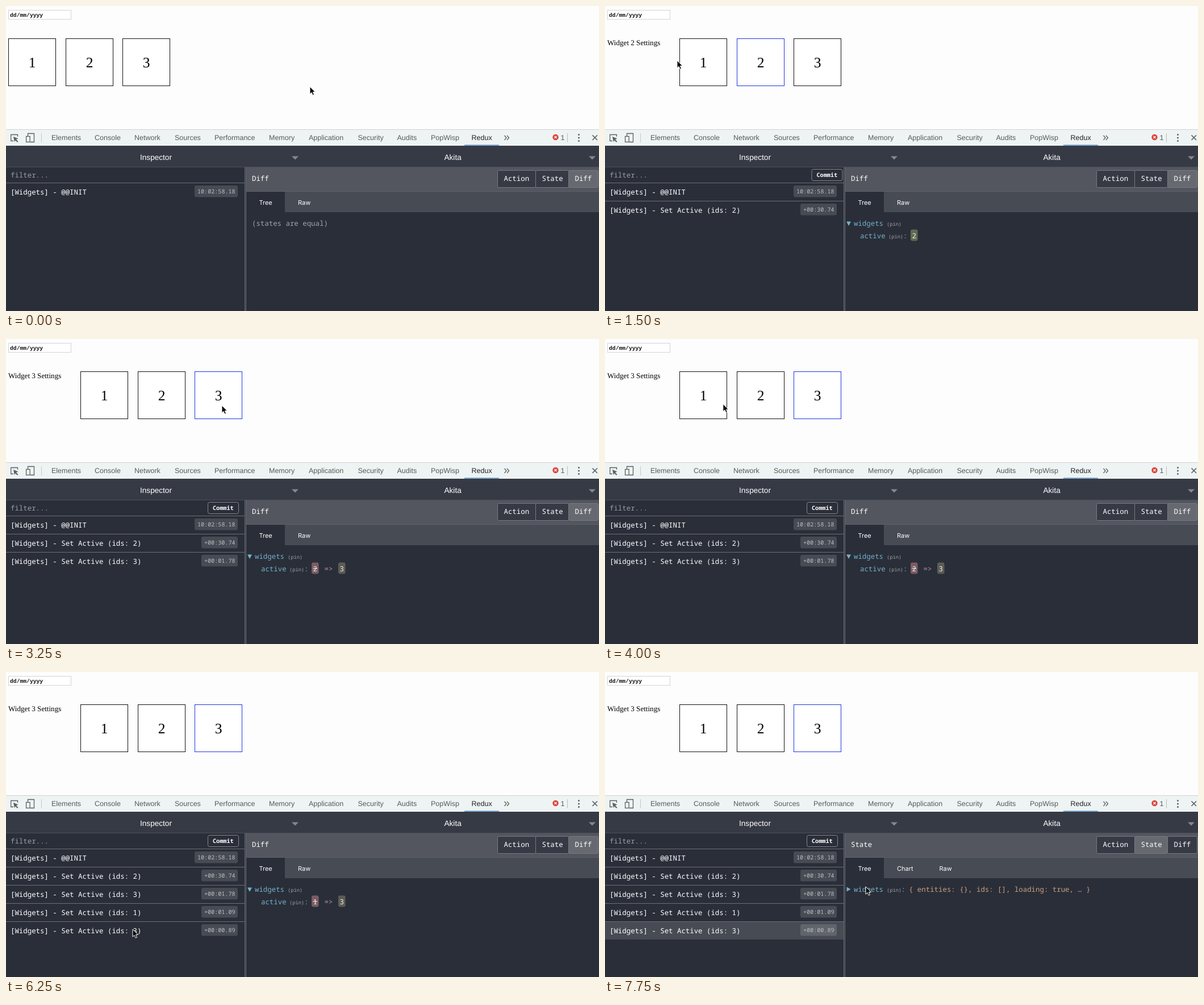
Write an HTML page that moves like this. It is 1044 by 537 pixels and loops after 8000 ms.

```html
<!DOCTYPE html>
<html lang="en">
<head>
<meta charset="utf-8">
<title>Widget store devtools</title>
<style>
  html, body { margin: 0; width: 100%; height: 100%; overflow: hidden; background: #fdfdfd; }
  svg { display: block; width: 100%; height: 100%; }
  text { white-space: pre; text-rendering: geometricPrecision; }
  .mono { font: 12.4px "Noto Sans Mono", monospace; }
  .pin { font: 8.7px "Noto Sans Mono", monospace; }
  .small { font: 500 10.1px "Noto Sans Mono", monospace; }
  .commit { font: 700 10.2px "Noto Sans Mono", monospace; }
  .date { font: 700 9.7px "Liberation Mono", monospace; }
  .tab { font: 12.5px "Liberation Sans", sans-serif; }
  .title { font: 13.6px "Liberation Sans", sans-serif; }
  .subtab { font: 11px Inter, sans-serif; }
  .label { font: 13.1px "Liberation Serif", serif; }
  .digit { font: 25.5px "Liberation Serif", serif; text-anchor: middle; }
</style>
</head>
<body>
<svg viewBox="0 0 1044 537">
  <g id="chrome"></g>
  <g id="view"></g>
  <path id="cursor" d="M0 0V13.2L3 10.4L5.2 15.2L7.5 14.2L5.4 9.5H9.4Z" fill="#000" stroke="#fff" stroke-width="1"/>
</svg>
<script>
const LOOP = 8000, STEP = 250;
const DARK = '#2a2e38', PANEL = '#363a44', BAR = '#53565e', TABS = '#474b54';
const LINE = '#6c6f76', ACTIVE = '#66696f', BLUE = '#74b1ce', MUTED = '#a0a3a8', WHITE = '#fff';

const text = (cls, x, y, str, fill = WHITE, extra = '') =>
  `<text class="${cls}" x="${x}" y="${y}" fill="${fill}" ${extra}>${str.replace(/>/g, '&gt;')}</text>`;
const rect = (x, y, w, h, fill, extra = '') =>
  `<rect x="${x}" y="${y}" width="${w}" height="${h}" fill="${fill}" ${extra}/>`;
const path = (d, fill, extra = '') => `<path d="${d}" fill="${fill}" ${extra}/>`;
const stroke = (color, width = 1) => `stroke="${color}" stroke-width="${width}"`;

const events = [
  { at: 0, label: '@@INIT', stamp: '10:02:58.18' },
  { at: 1500, id: 2, stamp: '+00:30.74' },
  { at: 3250, id: 3, stamp: '+00:01.78' },
  { at: 4250, id: 1, stamp: '+00:01.09' },
  { at: 5250, id: 3, stamp: '+00:00.89' }
];
const SELECT_ROW = 6500, HOVER_STATE = 7000, SHOW_STATE = 7250;

// time, x, y of the pointer tip
const pointer = [
  [0, 535, 142], [1250, 127, 96], [1750, 127, 96], [3250, 380, 117],
  [4250, 176, 114], [4500, 176, 114], [5000, 394, 123], [5250, 394, 123],
  [6250, 223, 453], [6500, 223, 453], [7000, 962, 306], [7250, 962, 306],
  [7750, 459, 378], [8000, 459, 378]
];

function drawChrome() {
  const tabs = [
    [80, 'Elements'], [156, 'Console'], [226, 'Network'], [297, 'Sources'],
    [367, 'Performance'], [463, 'Memory'], [533, 'Application'], [619.5, 'Security'],
    [688.5, 'Audits'], [748, 'PopWisp'], [819.5, 'Redux']
  ];
  const icon = 'stroke="#5a5f61" stroke-width="1.3"';
  return rect(0, 0, 1044, 217, '#fdfdfd')
    + rect(4.5, 7.5, 110, 16, WHITE, stroke('#d4d4d4'))
    + text('date', 7, 18.5, 'dd/mm/yyyy', '#111')
    + rect(0, 217, 1044, 29, '#eef3f3') + rect(0, 217, 1044, 1, '#d0d3d3')
    + path('M13 237.5H8.7V226.5H20.5V230', 'none', icon)
    + path('M13 230L21.5 233.5L18 235L21.5 238.5L20 240L16.5 236.5L15 239.5Z', '#5a5f61')
    + path('M38.5 229V224.5H49.5V239.5H43', 'none', icon)
    + rect(35.6, 229.5, 6.5, 10, '#eef3f3', icon)
    + rect(62, 224, 1, 16, '#c4c8c8')
    + tabs.map(([x, name]) => text('tab', x, 236, name, name === 'Redux' ? '#222' : '#555a5c')).join('')
    + rect(807, 244, 61, 2, '#82add6')
    + path('M877.5 228L881 232L877.5 236M882 228L885.5 232L882 236', 'none', icon)
    + '<circle cx="967.5" cy="231" r="5.2" fill="#d9453d"/>'
    + path('M965.5 229L969.5 233M969.5 229L965.5 233', 'none', stroke(WHITE, 1.1))
    + text('tab', 976.5, 236, '1', '#555a5c')
    + rect(988, 224, 1, 16, '#b9bdbd')
    + [226.5, 232, 237.5].map(y => `<circle cx="1008.5" cy="${y}" r="1.5" fill="#5a5f61"/>`).join('')
    + path('M1032.5 227.5L1041 236M1041 227.5L1032.5 236', 'none', 'stroke="#5a5f61" stroke-width="1.7"')
    + rect(0, 246, 1044, 37, PANEL)
    + text('title', 236, 271, 'Inspector') + text('title', 771.5, 271, 'Akita')
    + [509, 1032].map(x => path(`M${x - 6} 264.5h12l-6 6z`, '#858890')).join('')
    + rect(0, 283, 1044, 254, DARK) + rect(0, 283, 1044, 1, '#4b4f58')
    + text('mono', 8, 302, 'filter...', '#9a9da3')
    + rect(0, 311, 420, 1, LINE)
    + rect(420, 284, 1, 253, LINE) + rect(422, 284, 1, 253, LINE)
    + rect(423, 284, 621, 42, BAR)
    + rect(423, 326, 621, 37, TABS) + rect(423, 326, 621, 1, '#5d6068')
    + rect(423, 327, 68, 37, DARK)
    + text('subtab', 445.5, 350, 'Tree');
}

function drawWidgets(active) {
  const left = active ? 131 : 4;
  return (active ? text('label', 4, 68.5, `Widget ${active} Settings`, '#000') : '')
    + [1, 2, 3].map(n => {
      const x = left + (n - 1) * 100.5;
      const snapped = Math.round(x) + .5;
      return rect(snapped, 57.5, 83, 83, WHITE, stroke(n === active ? '#1f36e0' : '#111'))
        + text('digit', snapped + 41.5, 107.5, String(n), '#000');
    }).join('');
}

function drawLog(log, t) {
  const rows = log.map((event, i) => {
    const y = 311 + i * 32;
    const selected = i === 4 && t >= SELECT_ROW;
    const width = event.id ? 64 : 76;
    const label = event.label || `Set Active (ids: ${event.id})`;
    return (selected ? rect(0, y + 1, 420, 31, TABS) : '')
      + (i ? rect(0, y, 420, 1, LINE) : '')
      + text('mono', 8, y + 20.5, `[Widgets] - ${label}`)
      + rect(408 - width, y + 5, width, 20.5, selected ? '#60646b' : TABS, 'rx="3"')
      + text('small', 413 - width, y + 19, event.stamp, '#bcbec1');
  });
  if (log.length > 1) {
    const x = t < 1750 ? 364 : 355.5;
    rows.push(rect(x, 287.5, 54, 20, DARK, `rx="3" ${stroke('#85888e')}`)
      + text('commit', x + 8.5, 300.5, 'Commit'));
  }
  return rows.join('');
}

function drawButtons(mode, t) {
  const hover = t >= HOVER_STATE && t < SHOW_STATE;
  const fill = name => name === mode ? ACTIVE : name === 'State' && hover ? '#838589' : PANEL;
  return [['Action', 865.5, 67], ['State', 932.5, 58], ['Diff', 990.5, 52]].map(([name, x, w]) =>
    rect(x, 289.5, w, 30, fill(name), `rx="2" ${stroke('#777a80')}`)
    + text('mono', x + 11, 308, name)).join('');
}

function drawValue(x, value, fill, old) {
  return rect(x, 393.5, 12.5, 20, fill, 'rx="3"')
    + text('mono', x + 2.6, 408.5, String(value), '#f0eee9', old ? 'text-decoration="line-through"' : '');
}

function drawTree(log, mode) {
  const root = text('mono', 438, 386.5, 'widgets', BLUE) + text('pin', 496, 386.5, '(pin)', MUTED);
  if (mode === 'State') {
    return text('subtab', 514, 350, 'Chart') + text('subtab', 588.5, 350, 'Raw')
      + path('M425.5 378.5V386.5L432.5 382.5Z', BLUE) + root
      + text('mono', 521.5, 386.5, ':', BLUE)
      + text('mono', 535, 386.5, '{ entities: {}, ids: [], loading: true, … }', '#c9a083');
  }
  const raw = text('subtab', 514, 350, 'Raw');
  if (log.length < 2) return raw + text('mono', 433, 387, '(states are equal)', MUTED);
  const [before, now] = log.slice(-2);
  return raw + path('M425 379.5H433L429 387Z', BLUE) + root
    + text('mono', 449, 408.5, 'active', BLUE) + text('pin', 499, 408.5, '(pin)', MUTED)
    + text('mono', 525, 408.5, ':', BLUE)
    + (before.id
      ? drawValue(538, before.id, '#7b5b63', true) + text('mono', 560.5, 408.5, '=>', '#b98fb9')
        + drawValue(585, now.id, '#5c5c56')
      : drawValue(538, now.id, '#5f6a52'));
}

function drawView(t) {
  const log = events.filter(e => e.at <= t);
  const mode = t >= SHOW_STATE ? 'State' : 'Diff';
  return drawWidgets(log[log.length - 1].id) + drawLog(log, t)
    + text('mono', 433, 308, mode) + drawButtons(mode, t) + drawTree(log, mode);
}

function pointerAt(t) {
  const i = pointer.findIndex(([time]) => time > t);
  const [t0, x0, y0] = pointer[i - 1], [t1, x1, y1] = pointer[i];
  const p = (t - t0) / (t1 - t0), eased = p * p * (3 - 2 * p);
  return [x0 + (x1 - x0) * eased, y0 + (y1 - y0) * eased];
}

const $ = id => document.getElementById(id);
$('chrome').innerHTML = drawChrome();
const start = performance.now();
let shown = -1;

function tick() {
  const t = Math.floor((performance.now() - start) % LOOP / STEP) * STEP;
  if (t !== shown) {
    shown = t;
    $('view').innerHTML = drawView(t);
    $('cursor').setAttribute('transform', `translate(${pointerAt(t)})`);
  }
  requestAnimationFrame(tick);
}
tick();
</script>
</body>
</html>
```
